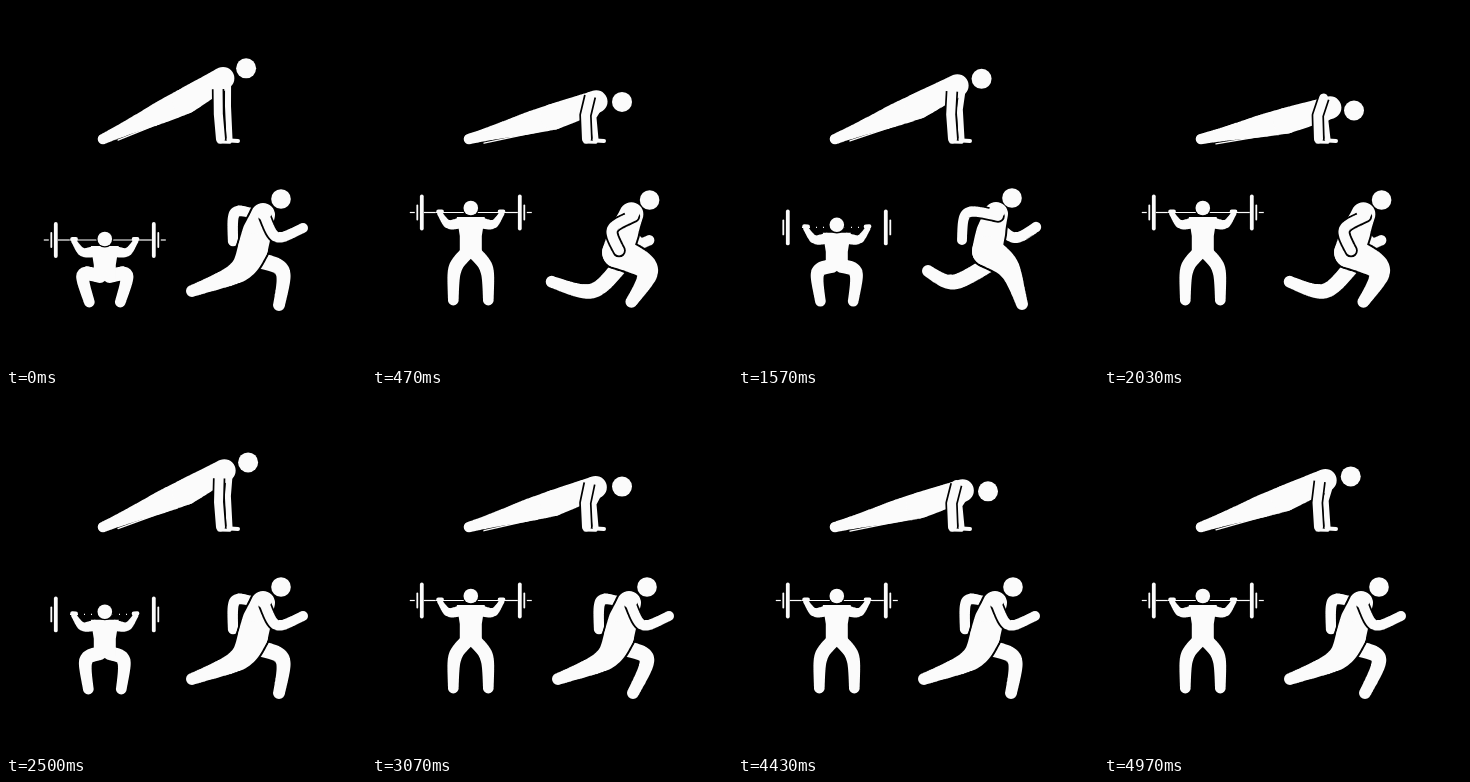
An HTML page with a canvas that plays this animation: 360 px wide and 360 px high, repeating every 5 s.

```html
<!DOCTYPE html>
<html lang="en">
<head>
<meta charset="utf-8">
<title>Exercise figures</title>
<style>
  html, body { margin: 0; width: 100%; height: 100%; overflow: hidden; background: #000; }
  canvas { display: block; width: 360px; height: 360px; }
</style>
</head>
<body>
<canvas id="stage"></canvas>
<script>
const LOOP = 5000, TICK = 1000 / 30;
const REP = 1317, STRIDE = 625, STEPS = 9;
const WHITE = '#fbfbfb', BLACK = '#000';

const canvas = document.getElementById('stage');
const scale = window.devicePixelRatio || 1;
canvas.width = canvas.height = 360 * scale;
const ctx = canvas.getContext('2d');
ctx.scale(scale, scale);

const lerp = (a, b, k) => a + (b - a) * k;
const mix = (a, b, k) => a.map((v, i) => lerp(v, b[i], k));
const shift = ([x, y], dx, dy) => [x + dx, y + dy];
const wrap = (v, n) => ((v % n) + n) % n;
const smooth = (a, b, v) => {
  const u = Math.min(1, Math.max(0, (v - a) / (b - a)));
  return u * u * (3 - 2 * u);
};

function disc([x, y], r, color = WHITE) {
  ctx.fillStyle = color;
  ctx.beginPath();
  ctx.arc(x, y, r, 0, 7);
  ctx.fill();
}

function line(pts, width, color = WHITE, cap = 'round') {
  ctx.strokeStyle = color;
  ctx.lineWidth = width;
  ctx.lineCap = cap;
  ctx.lineJoin = 'round';
  ctx.beginPath();
  pts.forEach(([x, y]) => ctx.lineTo(x, y));
  ctx.stroke();
}

// Curved limb pulled towards its joint, with radii at start, middle and end
function limb(a, joint, b, radii, grow = 0, color = WHITE) {
  const n = 70, [r0, r1, r2] = radii;
  ctx.fillStyle = color;
  ctx.beginPath();
  for (let i = 0; i <= n; i++) {
    const t = i / n, u = 1 - t;
    const wa = u * u * u, wb = t * t * t, wj = 1 - wa - wb;
    const x = wa * a[0] + wj * joint[0] + wb * b[0];
    const y = wa * a[1] + wj * joint[1] + wb * b[1];
    const r = (t < 0.5 ? lerp(r0, r1, t * 2) : lerp(r1, r2, t * 2 - 1)) + grow;
    ctx.moveTo(x + r, y);
    ctx.arc(x, y, r, 0, 2 * Math.PI);
  }
  ctx.fill();
}

// Straight limb
const bone = (a, b, r0, r1) => limb(a, mix(a, b, 0.5), b, [r0, (r0 + r1) / 2, r1]);

function pushUp(t) {
  const angle = (t - 38) / REP * 2 * Math.PI;
  const low = (1 - Math.cos(angle)) / 2;
  const y = 62 + low * (43 + 4 * Math.sin(angle));   // lowers a little faster than it rises
  const k = (y - 62) / 28;
  const at = (x0, y0, x1, y1) => [lerp(x0, x1, k), lerp(y0, y1, k)];

  const toe = [97, 133], hip = at(179, 95, 181, 108), shoulder = at(217, 72, 223, 91.5);
  bone(toe, hip, 5.3, 13);
  bone(hip, shoulder, 13, 11.3);
  line([at(112, 134, 112, 136.5), at(164, 113, 168, 123)], 1.3);

  line([at(222, 80, 228, 95), at(222, 100, 221.5, 109), [223.5, 133]], 6);
  line([[224, 134.5], [232, 135]], 4);
  const arm = [at(212, 83, 217, 89), at(212.3, 108, 213.3, 109), [214.5, 133]];
  line(arm, 12.4, BLACK, 'butt');
  line(arm, 9);
  line([[213, 136], [224, 136.3]], 3);
  disc([240 + Math.min(10, 0.33 * (y - 62)), y], 10);
}

function squat(t) {
  const rel = wrap(t - 60, REP);
  const k = 1 - smooth(100, 290, Math.min(rel, REP - rel));
  const mid = 98.8;
  const y = 202 + 31 * k;
  const bar = y + 4.5 - 3.5 * k;
  const top = y + lerp(10, 8, k);
  const hip = lerp(248, 270, k);
  const faint = k > 0.25 && k < 0.75;

  ctx.setLineDash(faint ? [1, 6] : []);
  line([[64, bar], [134, bar]], 1.2, WHITE, 'butt');
  ctx.setLineDash([]);

  for (const s of [-1, 1]) {
    const p = (dx, py) => [mid + s * dx, py];
    if (!faint) {
      line([p(56, bar), p(61, bar)], 1.2, WHITE, 'butt');
      line([p(35, bar), p(47, bar)], 1.2, WHITE, 'butt');
    }
    line([p(49, bar - 16), p(49, bar + 16)], 3.8);
    line([p(53.5, bar - 7), p(53.5, bar + 7)], 1.8);
    limb(p(31, bar + 1), p(23, bar + 14), p(10, top + 4.5), [2.6, 4.2, 5.5]);
    line([p(29, bar - 0.8), p(32.5, bar - 1)], 4.2);
    limb(p(5, hip), p(lerp(17.5, 25.5, k), lerp(261, 265, k)),
      p(lerp(17.5, 15.5, k), lerp(294, 296, k)), [7, 6.8, 5.4]);
  }

  ctx.fillStyle = WHITE;
  ctx.beginPath();
  for (const [dx, py] of [[14, top - 1], [11, top + 18], [11, hip + 3]]) ctx.lineTo(mid + dx, py);
  for (const [dx, py] of [[11, hip + 3], [11, top + 18], [14, top - 1]]) ctx.lineTo(mid - dx, py);
  ctx.fill();
  disc([mid, y], 8.6, BLACK);
  disc([mid, y], 7.3);
}

// Runner joints: each swings from one point to another along an arc with the given bend
const JOINTS = {
  head:   [[275, 193], [274, 192], [4, 2]],
  neck:   [[257, 209], [258, 208], [2, 0]],
  hip:    [[247, 242], [249, 245], [-4, 3]],
  nKnee:  [[238, 266], [272, 259], [25, 1]],
  nFoot:  [[186, 285], [284, 298], [5, 2]],
  fKnee:  [[281, 261], [214, 281], [-14, 19]],
  fFoot:  [[273, 299], [196, 265], [-36, 1]],
  nElbow: [[269, 236], [225, 202], [-3, 12]],
  nHand:  [[297, 222], [224, 234], [2, 17]],
  fElbow: [[226, 202], [275, 237], [6, 16]],
  fHand:  [[227, 235], [298, 221], [0, 11]],
};

function runner(t) {
  const step = Math.floor(wrap(t + 0.5, STRIDE) / STRIDE * STEPS);
  const k = Math.sin(Math.PI * step / (STEPS - 1));
  const arc = 4 * k * (1 - k);
  const j = {};
  for (const [name, [from, to, bend]] of Object.entries(JOINTS)) {
    j[name] = shift(mix(from, to, k), arc * bend[0], arc * bend[1]);
  }
  j.fFoot[0] -= 1.5 * step;   // the far foot draws in through the stride

  limb(shift(j.neck, -8, -1), j.fElbow, j.fHand, [5, 5.5, 5.2]);
  limb(shift(j.hip, 4, 12), j.fKnee, j.fFoot, [8, 7.5, 6]);
  const chest = shift(mix(j.neck, j.hip, 0.5), -1, 0);
  for (const [grow, color] of [[2, BLACK], [0, WHITE]]) {
    limb(j.neck, chest, j.hip, [12, 14.5, 15], grow, color);
    limb(j.hip, j.nKnee, j.nFoot, [15, 11, 6], grow, color);
  }
  const arm = shift(j.neck, 2, 2);
  limb(arm, j.nElbow, j.nHand, [5, 5.2, 5], 1.8, BLACK);
  limb(arm, j.nElbow, j.nHand, [5, 5.2, 5]);
  disc(shift(j.neck, 1, -3), 8);
  disc(j.head, 9.8);
}

function draw(now) {
  const t = Math.floor((now % LOOP) / TICK + 0.15) * TICK;
  ctx.fillStyle = BLACK;
  ctx.fillRect(0, 0, 360, 360);
  pushUp(t);
  squat(t);
  runner(t);
}

const start = performance.now();
function tick() {
  draw(performance.now() - start);
  requestAnimationFrame(tick);
}
tick();
</script>
</body>
</html>
```
